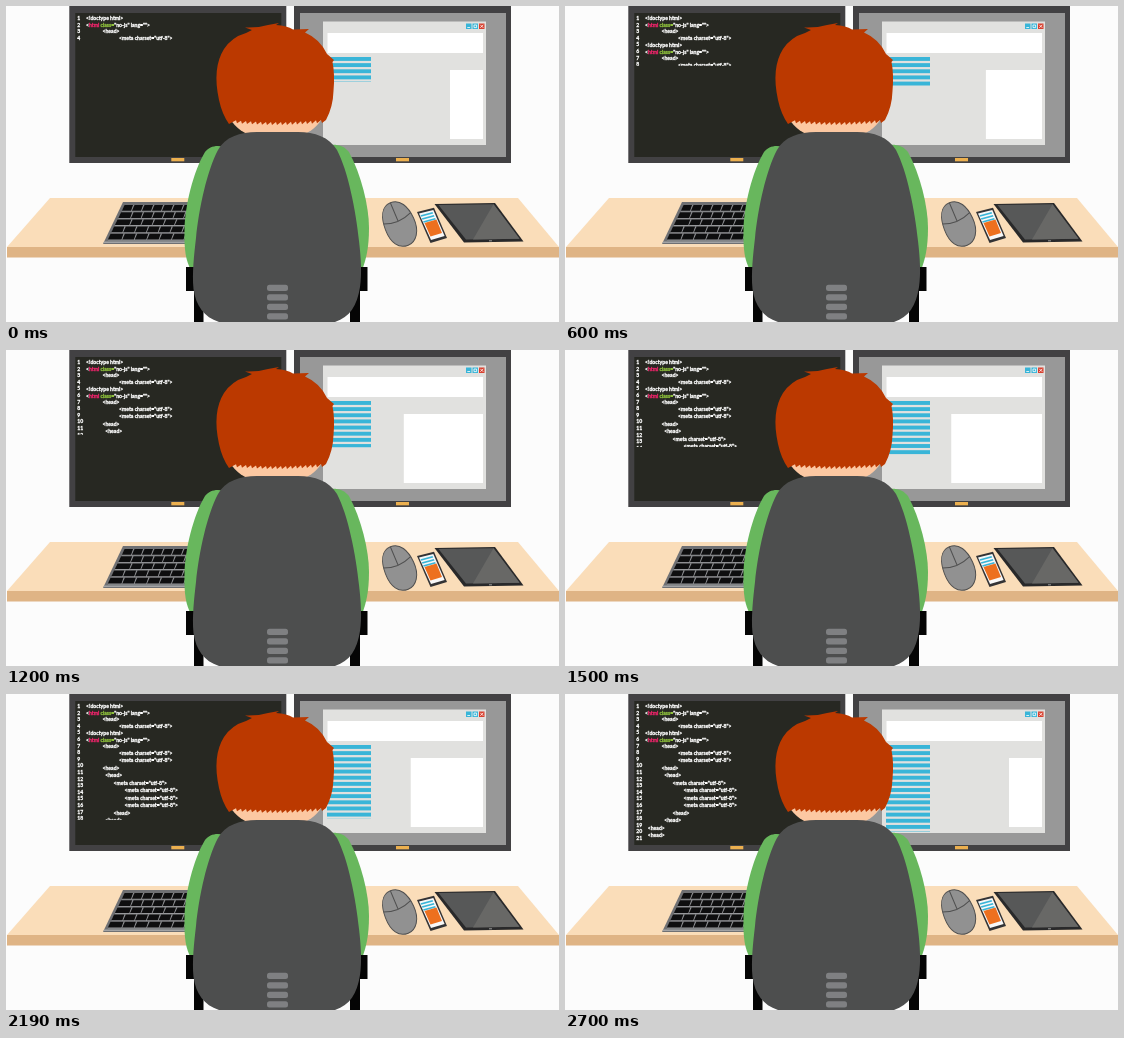
Write an HTML page with a canvas that moves like this. It is 553 px wide and 316 px high and loops after 2730 ms.

```html
<!DOCTYPE html>
<html lang="en">
<head>
<meta charset="utf-8">
<title>Coding at a desk</title>
<style>
html, body { margin: 0; width: 100%; height: 100%; overflow: hidden; background: #fcfcfc; }
canvas { display: block; }
</style>
</head>
<body>
<canvas id="stage" width="553" height="316"></canvas>
<script>
const ctx = document.getElementById('stage').getContext('2d');
const LOOP = 2730, STEP = 30;
const BLUE = '#39b5d8', GREEN = '#68b75d', DARK = '#424143';

const clamp = (v, low, high) => Math.min(high, Math.max(low, v));

function rect(x, y, w, h, color) {
  ctx.fillStyle = color;
  ctx.fillRect(x, y, w, h);
}

function shape(color, d) {
  ctx.fillStyle = color;
  ctx.fill(new Path2D(d));
}

function line(color, width, d) {
  ctx.strokeStyle = color;
  ctx.lineWidth = width;
  ctx.stroke(new Path2D(d));
}

function clipped(x, y, w, h, draw) {
  ctx.save();
  ctx.beginPath();
  ctx.rect(x, y, w, h);
  ctx.clip();
  draw();
  ctx.restore();
}

const OPENING = `<!doctype html>
<html class="no-js" lang="">
      <head>
            <meta charset="utf-8">
`;
const CODE = (OPENING + OPENING + `            <meta charset="utf-8">
      <head>
       <head>
          <meta charset="utf-8">
              <meta charset="utf-8">
              <meta charset="utf-8">
              <meta charset="utf-8">
          <head>
       <head>
 <head>
 <head>`).split('\n');

const TOKEN = /html (?=class)|class=|[^ ]+ ?/g;
const tokenColor = token => ({ 'html ': '#f0246b', 'class=': '#8fc23c' })[token] || '#fff';

function boldText(text, x, y, color) {
  ctx.fillStyle = ctx.strokeStyle = color;
  ctx.fillText(text, x, y);
  ctx.strokeText(text, x, y);
}

function drawCode() {
  ctx.font = '700 5.1px Lato, sans-serif';
  ctx.lineWidth = 0.3;
  for (let n = 0; n < 21; n++) boldText(n + 1, 71.3, 14 + n * 6.6, '#fff');
  CODE.forEach((source, i) => {
    const text = source.trimStart();
    let x = 80 + (source.length - text.length) * 2.75;
    const y = 14 + i * 6.7 + Math.max(0, i - 7) * 0.78;
    for (const token of text.split(/(html (?=class)|class=)/)) {
      boldText(token, x, y, tokenColor(token));
      x += ctx.measureText(token).width;
    }
  });
}

function drawMonitor(x, screen) {
  rect(x, 0, 217, 157, DARK);
  rect(x + 6, 7, 206, 144, screen);
  rect(x + 102, 152, 13, 3.3, '#ecb04f');
}

function drawWindow(t) {
  rect(317, 15.5, 163, 123.5, '#e1e1df');
  for (let i = 0; i < 3; i++) rect(460 + i * 6.5, 17.5, 5.5, 5.5, i < 2 ? BLUE : '#d8402f');
  line('#fff', 0.8, 'M461.3 21.5h2.8M468 19h2.6v2.6h-2.6zM474.3 18.8l3 3m0-3l-3 3');
  rect(321.5, 27, 155.5, 20, '#fff');

  const listEnd = clamp(64 + 0.0278 * t, 76, 137.5);
  clipped(321, 51, 44, listEnd - 51, () => {
    for (let y = 51; y < listEnd; y += 6.15) rect(321, y, 44, 3.9, BLUE);
  });

  // The panel widens, then closes at twice the speed
  const width = 33 + 0.0385 * Math.min(t, 2 * (2700 - t));
  rect(477 - width, 64, width, 69, '#fff');
}

function drawKeyboard() {
  shape('#6f7073', 'M117 196H200V238H97Z');
  shape('#a2a3a5', 'M98 235.5H200V237H97.4Z');
  for (let row = 0; row < 5; row++) {
    const y = 199 + row * 7.2, pitch = 10 + row * 0.6;
    const left = 118.5 - row * 3.5;
    for (let k = 0; k < 9; k++) {
      const x = left + k * pitch + (k ? row % 3 * 2 : 0);
      const width = pitch - 1.4 + (k ? 0 : row % 3 * 2);
      shape('#98999c', `M${x} ${y}h${width + 0.8}l-2 6.6h-${width + 1.4}z`);
      shape('#0e0e0f', `M${x} ${y}h${width}l-2 5.7h-${width + 0.6}z`);
    }
  }
}

function drawMouse() {
  ctx.save();
  ctx.translate(393.3, 218);
  ctx.rotate(-0.4);
  const body = 'M0-23C10-23 15-13 15.5 0C16 14 9 23 0 23C-10 23-15.5 14-15 0C-14.5-13-10-23 0-23Z';
  shape('#919191', body);
  line('#505050', 1, body + 'M-14.5-6Q0 0 14.5-6M0-23V-3');
  ctx.restore();
}

function drawPhone() {
  shape('#333335', 'M411 206L428 201.7L441 232L424.5 237Z');
  shape('#f8f8f8', 'M413 207.6L427.3 204L438.6 230L425 234Z');
  for (let i = 0; i < 3; i++) {
    shape(BLUE, `M${414.5 + i * 1.3} ${209.2 + i * 3}l12-3.3l.7 1.6l-12 3.3z`);
  }
  shape('#ed701f', 'M418.5 217L430.5 213.5L436 227L424.5 230.5Z');
}

function drawTablet() {
  shape('#29292a', 'M428.5 198L489 197L517.5 235.5L458 236.5Z');
  shape('#575858', 'M432.5 199L487.5 198.3L513.5 232.7L460 233.5Z');
  shape('#686866', 'M487.5 198.3L513.5 232.7L467 233.4Z');
  rect(483, 234.3, 3, 1, '#999');
}

function drawDesk() {
  shape('#faddb9', 'M44 192H512L553 241H1Z');
  rect(1, 241, 552, 10.5, '#dfb485');
  drawKeyboard();
  drawMouse();
  drawPhone();
  drawTablet();
}

function drawHead() {
  ctx.fillStyle = '#fcc8a2';
  ctx.beginPath();
  ctx.ellipse(270, 98, 50, 37, 0, 0, 7);
  ctx.fill();

  let fringe = '';
  for (let x = 316; x > 226; x -= 5) {
    const y = 117 + 2 * Math.sin((316 - x) / 90 * Math.PI);
    fringe += `L${x} ${y}l-1-3`;
  }
  shape('#bb3900', `M240 27L246 24L239 21.5Q252 22 262 19L273 17L270 19Q281 19.5 287 23.5L303 23L299 26.5
    Q314 33 321 48L328 54L326.5 56Q329 68 327.5 85Q327 101 320 114${fringe}L223 118
    Q216 108 213 94Q206 62 218 43Q226 31 240 27Z`);
}

function drawChair() {
  shape('#4d4e4e', `M251 126H292C309 126 323 131 331 144C342 165 350 205 353 235
    C355 252 356 268 354 281C351 300 344 311 329 316H213C198 311 190 300 187.5 283
    C186 267 188 249 190 232C193 202 201 165 212 144C219 131 234 126 251 126Z`);
  ctx.fillStyle = '#7f8082';
  for (let i = 0; i < 4; i++) {
    ctx.beginPath();
    ctx.roundRect(261, 278.7 + i * 9.5, 21, 6.2, 2.5);
    ctx.fill();
  }
}

function drawPerson() {
  shape(GREEN, 'M224 143C214 138 204 139 199 146C187 166 179 200 178.5 224C178 244 180 255 185 264H230Z');
  shape(GREEN, 'M318 140C328 137 338 139 343 146C355 168 363 200 363 222C363 242 360 254 356 264H310Z');
  rect(180, 261, 12, 24, '#050505');
  rect(188, 284, 9.5, 32, '#050505');
  rect(350, 261, 11.5, 24, '#050505');
  rect(344, 284, 10, 32, '#050505');
  drawHead();
  drawChair();
}

function draw(t) {
  rect(0, 0, 553, 316, '#fcfcfc');
  drawMonitor(63.3, '#272822');
  drawMonitor(288, '#989898');
  clipped(69, 7, 206, 28 + 0.0414 * t, drawCode);
  drawWindow(t);
  drawDesk();
  drawPerson();
}

const start = performance.now();
function tick() {
  const elapsed = (performance.now() - start) % LOOP;
  draw(Math.floor(elapsed / STEP) * STEP);
  requestAnimationFrame(tick);
}
tick();
</script>
</body>
</html>
```
